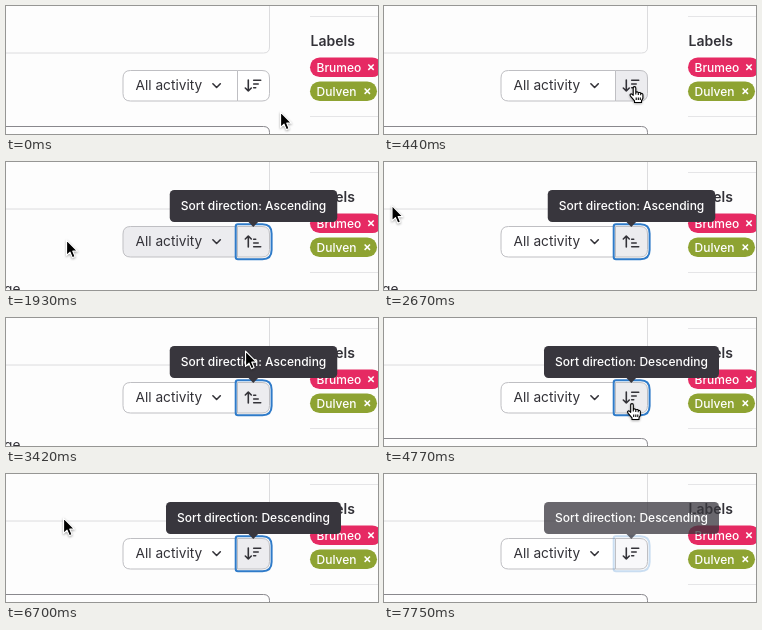
Animation, 372 px wide and 128 px high, one loop 7.77 s. Source, as an HTML page:

```html
<!DOCTYPE html>
<html lang="en">
<head>
<meta charset="utf-8">
<title>Sort direction</title>
<style>
  html, body { margin: 0; width: 100%; height: 100%; overflow: hidden; background: #fdfdfd; }
  svg { display: block; width: 372px; height: 128px; font: 13.7px Inter, sans-serif; fill: #333238; }
  .line { fill: none; stroke: #dcdcde; }
  .icon { fill: none; stroke: #333238; stroke-width: 1.6; stroke-linecap: round; stroke-linejoin: round; }
  .small { font-size: 12px; font-weight: 500; fill: #fff; }
  .close { fill: none; stroke: #fff; stroke-width: 1.5; }
  #pointer, #hand { filter: drop-shadow(0 1px 1px #0005); }
</style>
</head>
<body>
<svg viewBox="0 0 372 128">
  <path class="line" d="M0 47H257.5Q263.5 47 263.5 41V0"/>
  <path class="line" stroke-opacity=".7" d="M304 10.5H372M304 110.5H372"/>
  <path id="panel" class="line" style="stroke:#89888d" d="M0 120.5H257.5Q263.5 120.5 263.5 126.5V130"/>
  <text id="note" x="-2" y="132">ge</text>

  <text x="304.5" y="40" font-size="14" font-weight="600">Labels</text>
  <rect x="304" y="51.5" width="72" height="19.5" rx="9.75" fill="#e62a63"/>
  <text class="small" x="310.5" y="65.5">Brumeo</text>
  <path class="close" d="M362.3 58.5l5.4 5.4m0-5.4l-5.4 5.4"/>
  <rect x="304" y="75.5" width="67" height="19.5" rx="9.75" fill="#8ea332"/>
  <text class="small" x="310.5" y="89.5">Dulven</text>
  <path class="close" d="M358.6 82.5l5.4 5.4m0-5.4l-5.4 5.4"/>

  <path id="menu" stroke="#bfbfc3" d="M231.5 64.5H124.5Q117 64.5 117 72V87.5Q117 95 124.5 95H231.5z"/>
  <text x="129.5" y="84.3">All activity</text>
  <path class="icon" d="M206.9 77.8l3.7 3.7 3.7-3.7"/>
  <path id="sort" stroke="#bfbfc3" d="M231.5 64.5H256Q263.5 64.5 263.5 72V87.5Q263.5 95 256 95H231.5z"/>
  <path id="ring" fill="none" stroke="#2f7bc9" stroke-width="2" d="M232 62.3H256.5Q265.6 62.3 265.6 71.5V88Q265.6 97.2 256.5 97.2H232Q229.7 97.2 229.7 95V64.5Q229.7 62.3 232 62.3z"/>
  <path id="arrow" class="icon"/>

  <g id="tip" fill="#38363d">
    <rect id="tipBox" y="28" height="32" rx="4.5"/>
    <path d="M242.5 60h9.6l-4.8 5z"/>
    <text id="tipText" class="small" x="247.5" y="48.3" text-anchor="middle"></text>
  </g>

  <g id="pointer">
    <path transform="translate(-1 -1.5) scale(1.12)" fill="#000" stroke="#fff" stroke-linejoin="round" d="M.5.5V14.2L3.6 11.3 5.7 16.2 8.1 15.2 6 10.4H10.2z"/>
  </g>
  <path id="hand" fill="#fff" stroke="#000" stroke-width="1.1" stroke-linejoin="round"
    d="M5 16.5V14.8L1.2 10.4Q-.1 8.6 1.2 8 2.2 7.5 3.7 9.3V2Q3.7.6 5 .6T6.3 2V6.2Q8.6 5.4 8.8 6.8 11 6 11.2 7.5 13.4 7 13.4 9V12.2L12 14.8V16.5zM6.3 6.2V8.6M8.8 6.8V9M11.2 7.5V9.2M6.7 11.5V14M8.8 11.5V14M10.8 11.5V14"/>
</svg>
<script>
const LOOP = 7770, TICK = 149, LEAD = 14;
const el = id => document.getElementById(id);
const set = (id, attrs) => {
  for (const name in attrs) el(id).setAttribute(name, attrs[name]);
};
const show = (id, visible) => set(id, { visibility: visible ? 'visible' : 'hidden' });

// Pointer strokes, timed in ticks; "bend" is the control point of a curved stroke.
const home = [275, 107];
const strokes = [
  { start: 2, steps: 2, to: [245.5, 80] },
  { start: 13, steps: 1, to: [61, 79] },
  { start: 14, steps: 1, to: [60, 68] },
  { start: 16, steps: 8, bend: [-104, 28], to: [240, 34] },
  { start: 24, steps: 2, to: [267, 101] },
  { start: 27, steps: 2, to: [243, 85] },
  { start: 36, steps: 3, bend: [20, 70], to: [88, 58] },
  { start: 40, steps: 6, bend: [8, 20], to: [58, 45] },
  { start: 47, steps: 1, to: [89, 80] }
];

function pointerAt(tick) {
  let from = home;
  for (const { start, steps, bend, to } of strokes) {
    if (tick < start) break;
    const k = Math.min(1, (tick - start + 1) / steps);
    const mix = (a, b) => a + (b - a) * k;
    from = from.map((a, i) => bend
      ? mix(mix(a, bend[i]), mix(bend[i], to[i]))
      : mix(a, to[i]));
  }
  return from;
}

const bars = (y, step) => [0, 1, 2]
  .map(i => `M247.7 ${y + step * i}h${7 - 2.5 * i}`).join('');

function draw(t) {
  const tick = Math.floor((t + LEAD) / TICK);
  const [x, y] = pointerAt(tick);
  const within = (left, right) => x > left && x < right && y > 64 && y < 95;
  const overSort = within(231, 263);
  const overMenu = tick === 13 || within(117, 231);
  const ascending = tick >= 10 && tick < 32;
  const pressed = tick === 9 || tick === 31;
  const focused = tick >= 9;
  const leaving = tick >= 52;

  show('panel', !ascending);
  show('note', ascending);
  set('menu', { fill: overMenu ? '#ececef' : '#fff' });
  set('sort', {
    fill: pressed ? '#dcdcde' : leaving ? '#f8f8fa' : overSort || focused ? '#ececef' : '#fff'
  });
  set('ring', { opacity: leaving ? .25 : focused ? 1 : 0 });
  set('arrow', {
    d: ascending
      ? 'M242.3 85V74M239.3 77l3-3 3 3' + bars(84.7, -3.7)
      : 'M242.3 74V85M239.3 82l3 3 3-3' + bars(74.3, 3.7)
  });

  const width = ascending ? 167.5 : 175;
  set('tip', { opacity: leaving ? .75 : tick > 6 ? 1 : tick === 6 ? .5 : 0 });
  set('tipBox', { x: 247.5 - width / 2, width });
  el('tipText').textContent = 'Sort direction: ' + (ascending ? 'Ascending' : 'Descending');

  const transform = `translate(${x} ${y})`;
  set('pointer', { transform });
  set('hand', { transform });
  show('pointer', !overSort && tick < 48);
  show('hand', overSort);
}

const startTime = performance.now();
function frame() {
  draw((performance.now() - startTime) % LOOP);
  requestAnimationFrame(frame);
}
frame();
</script>
</body>
</html>
```
